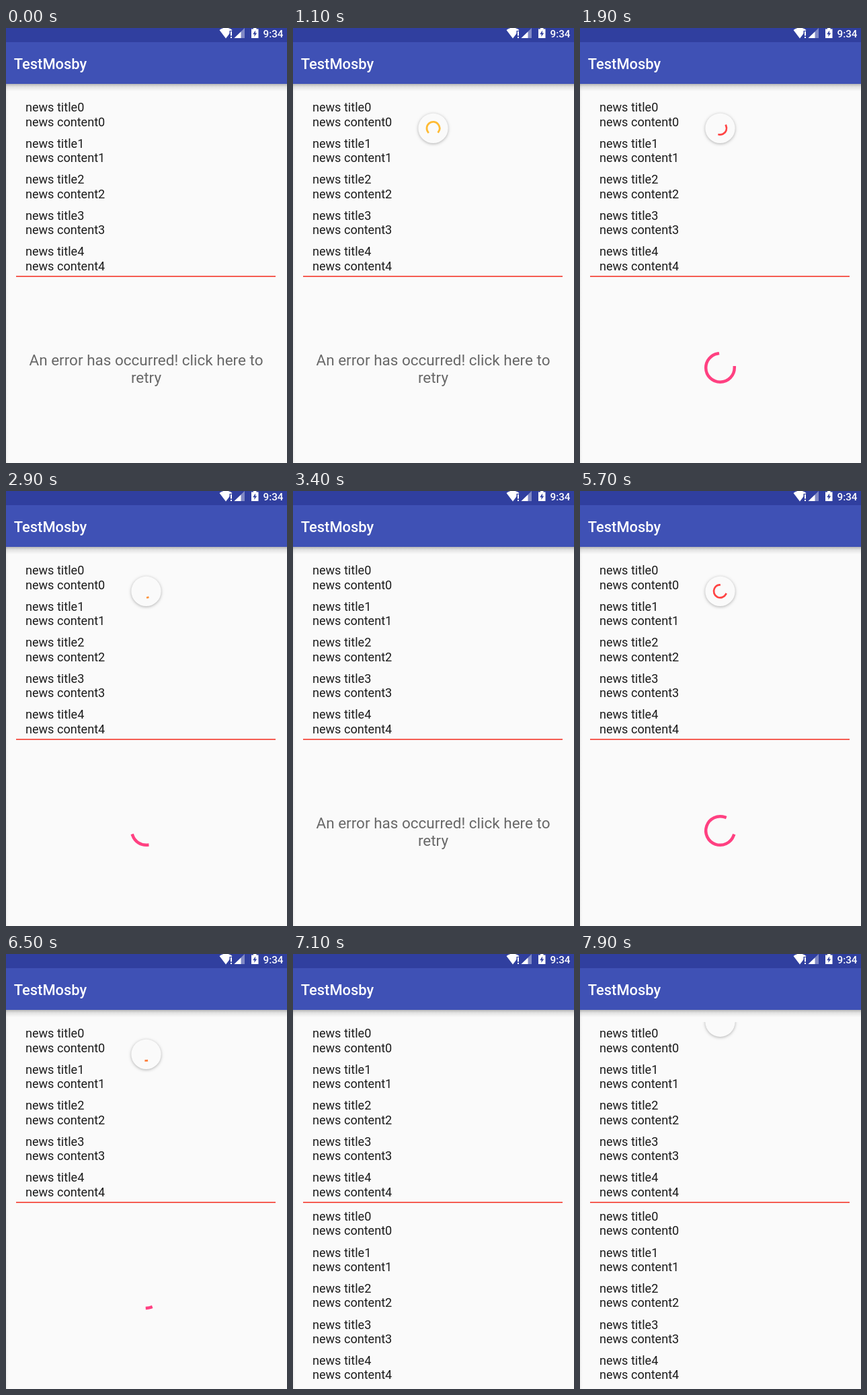
These frames come from a looping animation (418 px wide and 646 px high, 8 s). An HTML page with a canvas:

```html
<!DOCTYPE html>
<html lang="en">
<head>
<meta charset="utf-8">
<title>News list refresh</title>
<style>
html, body { margin: 0; width: 100%; height: 100%; overflow: hidden; background: #fafafa; }
canvas { display: block; }
</style>
</head>
<body>
<canvas id="stage" width="418" height="646"></canvas>
<script>
const ctx = document.getElementById('stage').getContext('2d');
const LOOP = 8000, STEP = 100, CYCLE = 1332, DP = 1.0885;
const CENTER_X = 208.5, LIST_TOP = 101, DRAG = 270, SETTLE = 160;
const ORANGE = [255, 187, 51], RED = [255, 68, 68];

const pulls = [
  { spin: 1017, end: 3170, base: -63 },
  { spin: 4670, end: 6850, base: -38 },
  { spin: 8287, end: 9999, base: -38 },
];
const loads = [[1390, 3270], [5074, 6960]];

const clamp = v => Math.max(0, Math.min(1, v));
const rad = deg => deg * Math.PI / 180;
const lerp = (a, b, k) => a + (b - a) * k;

// cubic-bezier(.4, 0, .2, 1)
function fastOutSlowIn(x) {
  let lo = 0, hi = 1, s;
  for (let i = 0; i < 20; i++) {
    s = (lo + hi) / 2;
    const at = 1.2 * (1 - s) ** 2 * s + 0.6 * (1 - s) * s * s + s ** 3;
    if (at < x) lo = s; else hi = s;
  }
  return s * s * (3 - 2 * s);
}

// The head advances in the first half of a cycle, the tail in the second.
function sweep(base, max, cycles) {
  const n = Math.floor(cycles), f = cycles - n;
  const origin = base + n * (234 + max) + 234 * f;
  return [
    origin + max * fastOutSlowIn(clamp(f * 2 - 1)),
    origin + max * fastOutSlowIn(clamp(f * 2)),
  ];
}

function arc(x, y, r, width, [start, end], color) {
  ctx.strokeStyle = color;
  ctx.lineWidth = width;
  ctx.lineCap = 'square';
  ctx.beginPath();
  ctx.arc(x, y, r, rad(start), rad(Math.max(end, start + 1)));
  ctx.stroke();
}

function text(str, x, y, size, color, weight = 400, align = 'left') {
  ctx.font = `${weight} ${size}px Roboto, sans-serif`;
  ctx.textAlign = align;
  ctx.fillStyle = color;
  ctx.fillText(str, x, y);
}

function rect(x, y, w, h, color) {
  ctx.fillStyle = color;
  ctx.fillRect(x, y, w, h);
}

function poly(color, ...points) {
  ctx.fillStyle = color;
  ctx.beginPath();
  points.forEach(p => ctx.lineTo(...p));
  ctx.fill();
}

function fade(x, y, w, h, dx, dy, alpha) {
  const g = ctx.createLinearGradient(x, y, x + dx, y + dy);
  g.addColorStop(0, `rgba(0,0,0,${alpha})`);
  g.addColorStop(0.4, `rgba(0,0,0,${alpha * 0.35})`);
  g.addColorStop(1, 'rgba(0,0,0,0)');
  rect(x, y, w, h, g);
}

function drawBars() {
  fade(0, 83, 418, 11, 0, 11, 0.27);
  fade(0, 83, 4, 563, 4, 0, 0.06);
  rect(0, 0, 418, 21, '#303f9f');
  rect(0, 21, 418, 62, '#3f51b5');
  text('TestMosby', 11.7, 61, 21.9, '#fff', 500);
  text('9:34', 382.5, 14, 15.2, '#fff', 500);

  ctx.fillStyle = '#fff';
  ctx.beginPath();
  ctx.moveTo(327, 15.5);
  ctx.lineTo(317.5, 3);
  ctx.quadraticCurveTo(327, -4, 336.5, 3);
  ctx.fill();
  rect(332.5, 4, 5, 12, '#303f9f');
  rect(334, 5, 2, 6.5, '#fff');
  rect(334, 13, 2, 2, '#fff');

  poly('#8089c5', [339.5, 15], [355, 15], [355, 0]);
  poly('#fff', [339.5, 15], [349.5, 15], [349.5, 5.5]);

  rect(365, 1.5, 10.5, 13.5, '#fff');
  rect(368, 0, 4.5, 2, '#fff');
  poly('#303f9f', [371.2, 3.5], [367.2, 9.2], [369.7, 9.2], [369.2, 13], [373.3, 7.5], [370.8, 7.5]);
}

function drawNews(top, alpha) {
  ctx.globalAlpha = alpha;
  for (let i = 0; i < 5; i++) {
    const y = top + i * 53.5;
    text('news title' + i, 28.9, y, 18.1, '#1c1c1c');
    text('news content' + i, 28.9, y + 21.3, 18.1, '#1c1c1c');
  }
  ctx.globalAlpha = 1;
}

function drawError(alpha) {
  ctx.globalAlpha = alpha;
  text('An error has occurred! click here to', CENTER_X, 500.8, 22.5, '#686868', 400, 'center');
  text('retry', CENTER_X, 527.2, 22.5, '#686868', 400, 'center');
  ctx.globalAlpha = 1;
}

function drawLower(t) {
  const load = loads.find(([from, to]) => t >= from && t < to);
  if (load) {
    arc(CENTER_X, 504.5, 21.3, 4.5, sweep(-90, 270, (t - load[0]) / CYCLE), '#ff4081');
  } else if (t >= loads[1][1]) {
    drawNews(396, clamp((t - loads[1][1]) / 130));
  } else {
    drawError(t < loads[0][0] ? 1 : clamp((t - loads[0][1]) / 130));
  }
}

function ringColor(index, f) {
  const pair = index % 2 ? [RED, ORANGE] : [ORANGE, RED];
  const k = clamp((f - 0.75) * 4);
  return `rgb(${pair[0].map((v, i) => Math.round(lerp(v, pair[1][i], k)))})`;
}

function drawRefresh(t, { spin, end, base }) {
  const pullStart = spin - SETTLE - DRAG;
  if (t < pullStart || t > end + 150) return;

  const rest = LIST_TOP + 44 * DP, hidden = LIST_TOP - 20 * DP;
  const drag = clamp((t - pullStart) / DRAG);
  const settle = clamp((t - spin + SETTLE) / SETTLE);
  const dragged = lerp(hidden, 215, drag);
  const y = lerp(dragged, rest, 1 - (1 - settle) ** 2);
  const percent = (dragged - hidden) / (rest - hidden);
  const reach = clamp((percent - 0.4) / 0.6);
  const scale = 1 - clamp((t - end) / 150);

  ctx.save();
  ctx.beginPath();
  ctx.rect(0, LIST_TOP, 418, 267);
  ctx.clip();
  ctx.translate(CENTER_X, y);
  ctx.scale(scale, scale);

  ctx.save();
  ctx.shadowColor = 'rgba(0,0,0,.3)';
  ctx.shadowBlur = 4;
  ctx.shadowOffsetY = 1;
  ctx.fillStyle = '#fafafa';
  ctx.beginPath();
  ctx.arc(0, 0, 20.4 * DP, 0, 7);
  ctx.fill();
  ctx.restore();

  const r = 8.75 * DP, width = 2.5 * DP;
  const finish = (t - spin) / (CYCLE / 2);
  if (finish < 0) {
    const start = base - 588 - 139 * (1 - drag), stop = start + 288 * reach;
    const head = 5 * DP * reach * (1 - settle);
    ctx.globalAlpha = percent < 1 ? 0.3 : 1;
    if (reach > 0) {
      arc(0, 0, r, width, [start, stop], ringColor(0, 0));
      ctx.rotate(rad(stop));
      poly(ringColor(0, 0), [r - head, 0], [r + head, 0], [r, head]);
    }
  } else if (finish < 1) {
    const stop = base - 300 * (1 - finish);
    arc(0, 0, r, width, [stop - 288 * (1 - finish), stop], ringColor(0, finish));
  } else {
    const cycles = (t - spin) / CYCLE - 0.5;
    const n = Math.floor(cycles);
    arc(0, 0, r, width, sweep(base, 288, cycles), ringColor(n + 1, cycles - n));
  }
  ctx.restore();
}

function draw(t) {
  rect(0, 0, 418, 646, '#fafafa');
  drawBars();
  // Refreshed rows cross-fade with the old ones.
  const dip = pulls.reduce((sum, p) => {
    const k = clamp((t - p.end) / 230);
    return sum + k * (1 - k);
  }, 0);
  drawNews(124.3, 1 - dip);
  rect(15, 368, 386, 1.6, '#f4382c');
  drawLower(t);
  pulls.forEach(p => drawRefresh(t, p));
}

const began = performance.now();
function tick() {
  const t = (performance.now() - began) % LOOP;
  draw(Math.floor(t / STEP) * STEP);
  requestAnimationFrame(tick);
}
tick();
</script>
</body>
</html>
```
